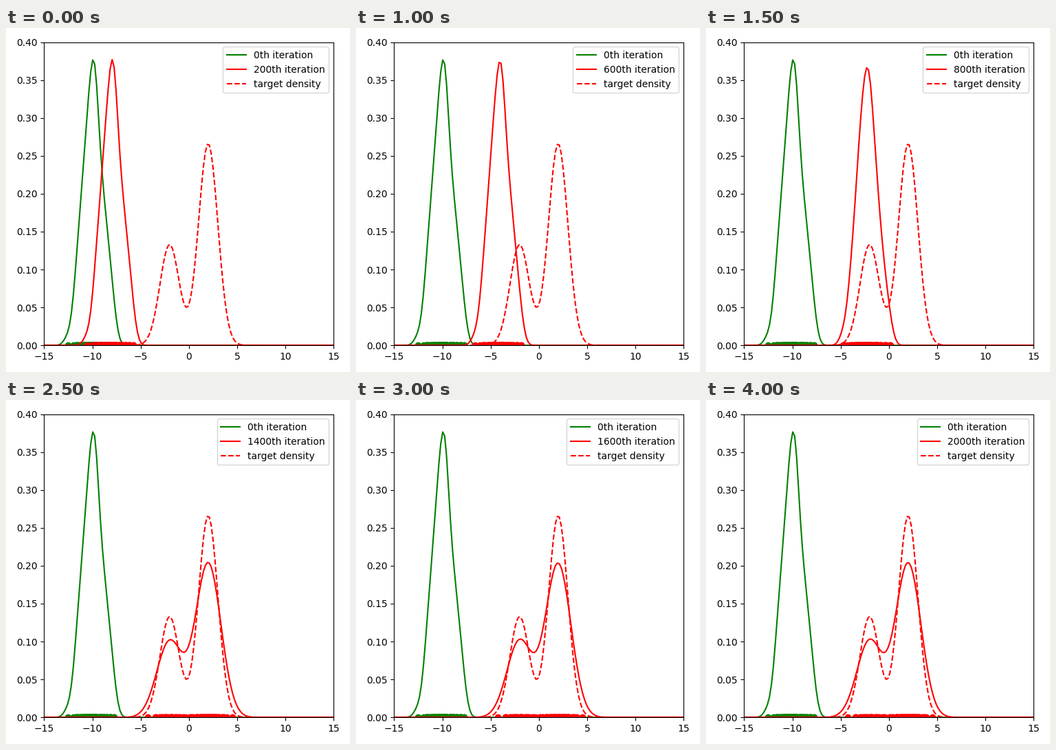
A matplotlib script for the animation above (4500 ms loop, 500 by 500 pixels).

```python
import numpy as np
import matplotlib.pyplot as plt
from matplotlib.animation import FuncAnimation

STEPS = [200, 400, 600, 800, 1200, 1400, 1600, 1800, 2000]
MEANS, WEIGHTS = np.array([-2.0, 2.0]), np.array([1 / 3, 2 / 3])


def normal(x, mean, sd=1.0):
    return np.exp(-0.5 * ((x - mean) / sd) ** 2) / (sd * np.sqrt(2 * np.pi))


def mixture(x):
    return normal(x[:, None], MEANS) @ WEIGHTS


def score(x):
    parts = WEIGHTS * normal(x[:, None], MEANS)
    return (parts * (MEANS - x[:, None])).sum(1) / parts.sum(1)


def kde(points, x):
    """Gaussian kernel density with Scott's bandwidth."""
    sd = points.std(ddof=1) * len(points) ** -0.2
    return normal(x[:, None], points, sd).mean(1)


def stein_step(x):
    diff = x[:, None] - x
    sq = diff ** 2
    h2 = 0.5 * np.median(sq) / np.log(len(x) + 1)
    kernel = np.exp(-0.5 * sq / h2)
    return (kernel @ score(x) + (kernel * diff).sum(1) / h2) / len(x)


def evolve(start, rate=0.01, decay=0.9):
    """Stein variational descent with running gradient scaling."""
    x, past, saved = start.copy(), None, {}
    for i in range(1, STEPS[-1] + 1):
        grad = stein_step(x)
        if past is None:
            past = grad ** 2
        else:
            past = decay * past + (1 - decay) * grad ** 2
        x = x + rate * grad / (1e-6 + np.sqrt(past))
        if i in STEPS:
            saved[i] = x
    return saved


start = np.random.RandomState(0).normal(-10, 1, 100)
particles = evolve(start)
grid = np.linspace(-15, 15, 150)
floor = np.zeros(len(start))

fig, ax = plt.subplots(figsize=(5, 5), dpi=100)
ax.set(xlim=(-15, 15), ylim=(0, 0.4))
ax.plot(grid, kde(start, grid), color="green", label="0th iteration")
ax.plot(start, floor, "o", color="green")
curve, = ax.plot(grid, 0 * grid, color="red")
dots, = ax.plot(start, floor, "o", color="red")
ax.plot(grid, mixture(grid), "r--", label="target density")
fig.tight_layout()


def draw(frame):
    step = STEPS[frame]
    curve.set_ydata(kde(particles[step], grid))
    curve.set_label(f"{step}th iteration")
    dots.set_xdata(particles[step])
    ax.legend(loc="upper right")
    return curve, dots


anim = FuncAnimation(fig, draw, frames=len(STEPS), interval=500,
                     init_func=lambda: draw(0), repeat=True, repeat_delay=0)
plt.show()
```
